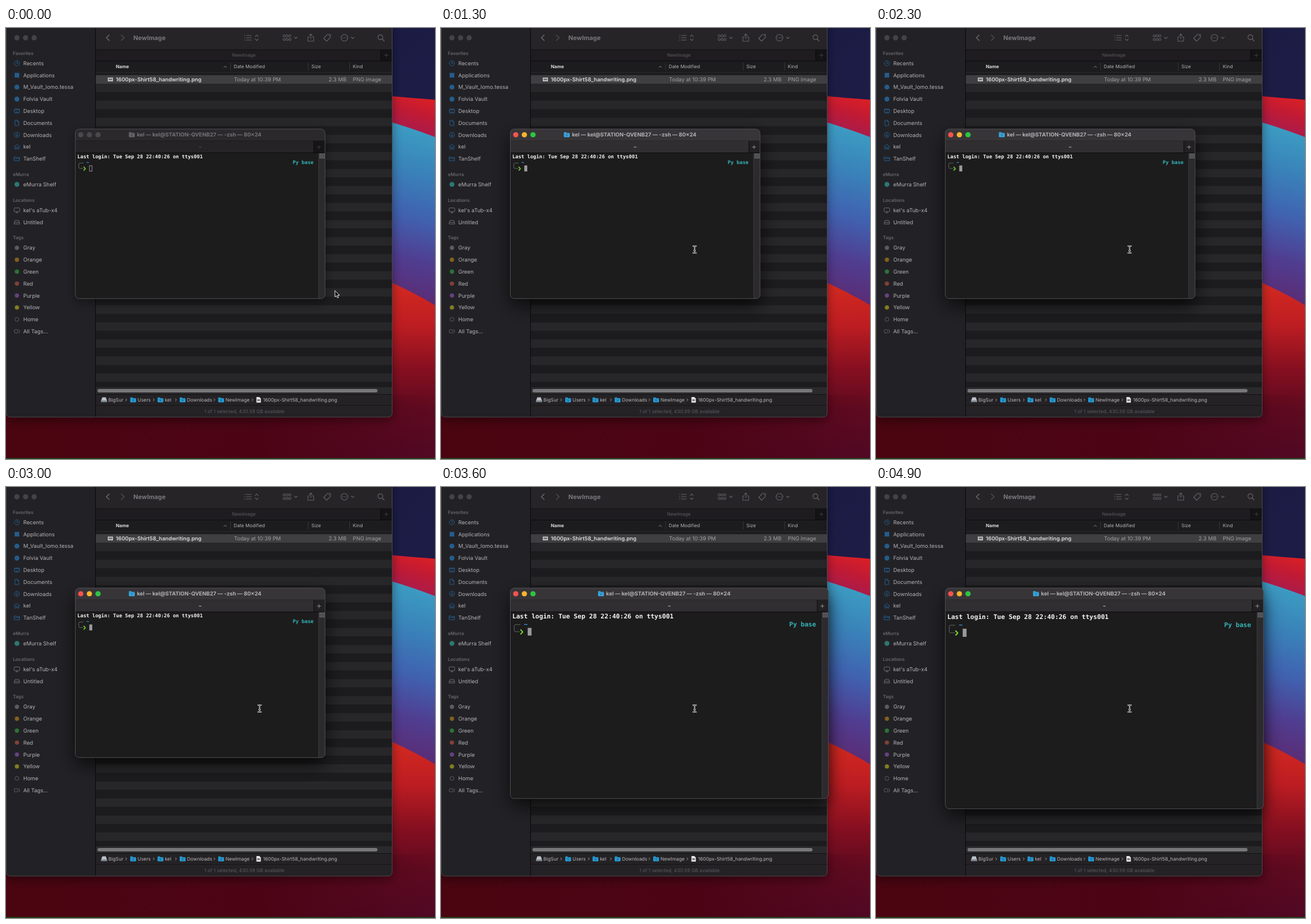
Animation, 746 px wide and 751 px high, one loop 5 s. Source, as an HTML page:

```html
<!DOCTYPE html>
<html lang="en">
<head>
<meta charset="utf-8">
<title>Terminal zoom</title>
<style>
html, body { margin: 0; width: 100%; height: 100%; overflow: hidden; background: #2a0309; }
svg { display: block; width: 746px; height: 751px; }
text { font-family: Inter, "Open Sans", sans-serif; text-rendering: geometricPrecision; white-space: pre; }
.mono { font-family: "DejaVu Sans Mono", "Liberation Mono", monospace; font-weight: 700; }
</style>
</head>
<body>
<svg id="stage" viewBox="0 0 746 751" xmlns="http://www.w3.org/2000/svg">
  <defs>
    <linearGradient id="navy" x1="0" y1="0" x2="1" y2="1">
      <stop offset="0" stop-color="#17173b"/><stop offset="1" stop-color="#20204f"/>
    </linearGradient>
    <linearGradient id="crimson" gradientUnits="userSpaceOnUse" x1="720" y1="120" x2="700" y2="185">
      <stop offset="0" stop-color="#d81f26"/><stop offset=".45" stop-color="#c01a35"/><stop offset="1" stop-color="#a51c50"/>
    </linearGradient>
    <linearGradient id="sea" gradientUnits="userSpaceOnUse" x1="725" y1="175" x2="650" y2="468">
      <stop offset="0" stop-color="#3c9dc2"/><stop offset=".25" stop-color="#3982b9"/>
      <stop offset=".5" stop-color="#4062b0"/><stop offset=".75" stop-color="#503d90"/>
      <stop offset="1" stop-color="#5c2a72"/>
    </linearGradient>
    <linearGradient id="ember" gradientUnits="userSpaceOnUse" x1="0" y1="440" x2="0" y2="751">
      <stop offset="0" stop-color="#d42a20"/><stop offset=".25" stop-color="#bd1d22"/>
      <stop offset=".5" stop-color="#850f20"/><stop offset=".72" stop-color="#5f0a20"/>
      <stop offset="1" stop-color="#500824"/>
    </linearGradient>
    <linearGradient id="floor" x1="0" y1="0" x2="1" y2="0">
      <stop offset="0" stop-color="#4a0510"/><stop offset=".6" stop-color="#4c0415"/><stop offset="1" stop-color="#4c0415" stop-opacity="0"/>
    </linearGradient>
    <filter id="faint" x="-20%" y="-20%" width="140%" height="150%">
      <feDropShadow dx="0" dy="6" stdDeviation="9" flood-color="#000" flood-opacity=".42"/>
    </filter>
    <filter id="deep" x="-20%" y="-20%" width="140%" height="150%">
      <feDropShadow dx="0" dy="12" stdDeviation="16" flood-color="#000" flood-opacity=".7"/>
    </filter>
    <clipPath id="list"><rect x="156" y="78" width="515" height="548"/></clipPath>
    <g id="folder">
      <path d="M0 1.6q0-1.2 1.2-1.2h2.6l1.2 1.2h4q1.2 0 1.2 1.2v5q0 1.2-1.2 1.2h-7.8q-1.2 0-1.2-1.2z"/>
      <path d="M0 3.2h10.2" stroke="#000" stroke-opacity=".25" stroke-width=".7"/>
      <rect x="3.6" y="4.5" width="3" height="2.7" fill="#000" fill-opacity=".25"/>
    </g>
  </defs>

  <rect width="746" height="751" fill="url(#navy)"/>
  <path d="M640 116.5Q710 122 746 125V200H640z" fill="url(#crimson)"/>
  <path d="M640 155Q705 174 746 190V490H640z" fill="url(#sea)"/>
  <path d="M0 437H655Q705 458 746 483V751H0z" fill="url(#ember)"/>
  <rect y="640" width="746" height="111" fill="url(#floor)"/>
  <rect y="749.5" width="746" height="1.5" fill="#17521c"/>

  <g id="finder"></g>
  <g id="term"></g>
  <g id="pointer">
    <path id="arrow" d="M0 0V11.2L2.6 8.9L4.3 12.7L6.2 11.9L4.5 8.2H8z" fill="#080808" stroke="#f2f2f2" stroke-width="1" stroke-linejoin="round"/>
    <g id="beam" fill="none">
      <path d="M-3.4-6.2Q-.4-6.2 0-4.8Q.4-6.2 3.4-6.2M0-4.8V4.8M-3.4 6.2Q-.4 6.2 0 4.8Q.4 6.2 3.4 6.2M-2 1.8H2" stroke="#f0f0f0" stroke-width="2.2"/>
      <path d="M-3-6.2Q-.4-6.2 0-4.8Q.4-6.2 3-6.2M0-4.8V4.8M-3 6.2Q-.4 6.2 0 4.8Q.4 6.2 3 6.2M-1.6 1.8H1.6" stroke="#111" stroke-width=".8"/>
    </g>
  </g>
</svg>
<script>
const $ = id => document.getElementById(id);
const LOOP = 5000, TICK = 100;
const SCALE = 0.743;              // screen points to stage pixels
const WIN = { x: 120.5, y: 176 };

const rect = (x, y, w, h, fill, more = '') =>
  `<rect x="${x}" y="${y}" width="${w}" height="${h}" fill="${fill}" ${more}/>`;
const dot = (x, y, r, fill, more = '') =>
  `<circle cx="${x}" cy="${y}" r="${r}" fill="${fill}" ${more}/>`;
const line = (d, stroke, width = 1, more = '') =>
  `<path d="${d}" fill="none" stroke="${stroke}" stroke-width="${width}" stroke-linecap="round" stroke-linejoin="round" ${more}/>`;
// y is the vertical middle of the text
const label = (x, y, s, size, fill, weight = 400, anchor = 'start') =>
  `<text x="${x}" y="${y + size * 0.36}" font-size="${size}" fill="${fill}" font-weight="${weight}" text-anchor="${anchor}">${s}</text>`;
const mono = (x, y, s, size, fill) =>
  `<text class="mono" x="${x}" y="${y + size * 0.35}" font-size="${size}" fill="${fill}">${s}</text>`;
const folder = (x, y, fill) => `<use href="#folder" x="${x}" y="${y}" fill="${fill}"/>`;

const BLUE = '#245c8c', GRAY = '#6b696d', TOOL = '#646267';

// Sidebar glyphs, drawn around 0,0
const glyphs = {
  clock: c => dot(0, 0, 4.3, 'none', `stroke="${c}"`) + line('M0-2.6V.3H2', c),
  square: c => rect(-4, -4, 8, 8, c),
  disc: c => dot(0, 0, 4.3, c),
  desktop: c => rect(-4.5, -3.5, 9, 7, 'none', `rx="1.2" stroke="${c}"`) + line('M-4.2-2H4.2M-2.5 2H2.5', c),
  page: c => line('M-3-4.5H.8L3.2-2V4.5H-3zM.8-4.5V-2H3.2', c),
  down: c => dot(0, 0, 4.3, 'none', `stroke="${c}"`) + line('M0-2.3V2.2M-1.8.5L0 2.3L1.8.5', c),
  home: c => line('M-4.8 0L0-4.3L4.8 0M-3.4-.8V4H-1V1H1V4H3.4V-.8', c),
  folder: c => line('M-4.5-3H-1.5L-.5-2H4.5V3.5H-4.5zM-4.5-.5H4.5', c),
  screen: c => rect(-4.8, -4, 9.6, 6.6, 'none', `rx="1" stroke="${c}"`) + line('M-1.8 4.4H1.8M0 2.8V4.2', c),
  drive: c => line('M-4.6.4L-3-3H3L4.6.4V3.2H-4.6zM-4.6.4H4.6', c),
  tag: c => dot(0, 0, 3.7, c),
  ring: c => dot(0, 0, 3.4, 'none', `stroke="${c}" stroke-width=".8"`),
  tags: c => rect(-4.5, -2.8, 6, 5.6, 'none', `rx="1.5" stroke="${c}" stroke-width=".8"`) + line('M3-2.8Q4.5-2.8 4.5-1.3V1.3Q4.5 2.8 3 2.8', c, .8)
};

const sections = [
  ['Favorites', 44, 61.5, [
    ['clock', 'Recents', BLUE], ['square', 'Applications', BLUE], ['disc', 'M_Vault_lomo.tessa', BLUE],
    ['disc', 'Folvia Vault', BLUE], ['desktop', 'Desktop', BLUE], ['page', 'Documents', BLUE],
    ['down', 'Downloads', BLUE], ['home', 'kel', BLUE], ['folder', 'TanShelf', BLUE]]],
  ['eMurra', 255, 272.5, [['disc', 'eMurra Shelf', '#2d7773']]],
  ['Locations', 300, 317.5, [['screen', "kel's aTub-x4", GRAY], ['drive', 'Untitled', GRAY]]],
  ['Tags', 365.5, 383, [
    ['tag', 'Gray', '#5c5b5e'], ['tag', 'Orange', '#84601f'], ['tag', 'Green', '#2c7336'],
    ['tag', 'Red', '#824036'], ['tag', 'Purple', '#674083'], ['tag', 'Yellow', '#857c20'],
    ['ring', 'Home', GRAY], ['tags', 'All Tags...', GRAY]]]
];

function sidebar() {
  return sections.map(([head, hy, top, items]) =>
    label(12, hy, head, 8, '#69676b', 600) +
    items.map(([icon, name, color], i) => {
      const y = top + i * 20.78;
      return `<g transform="translate(19 ${y})">${glyphs[icon](color)}</g>` + label(30, y, name, 9.4, '#b3b1b4');
    }).join('')).join('');
}

function toolbar() {
  const chevron = x => line(`M${x - 2.5} 15.8L${x} 18.3L${x + 2.5} 15.8`, TOOL, 1.2);
  let s = line('M179.5 12.2L174.5 17L179.5 21.8', '#6f6d71', 1.3) + line('M200.5 12.2L205.5 17L200.5 21.8', '#504e52', 1.3);
  s += label(221.5, 17, 'NewImage', 10.8, '#79777b', 700);
  for (const y of [13, 17, 21]) s += dot(415, y, .8, TOOL) + line(`M418 ${y}H426.5`, TOOL, 1.2);
  s += line('M433.5 14.8L436 12.2L438.5 14.8M433.5 19.2L436 21.8L438.5 19.2', TOOL, 1.2);
  for (const y of [12, 18.3]) for (const x of [482, 487, 492]) s += rect(x, y, 3.4, 3.4, 'none', `rx=".6" stroke="${TOOL}"`);
  s += chevron(504);
  s += line('M527.5 15.5H525V23H535V15.5H532.5M530 19V10.5M527.5 12.8L530 10.3L532.5 12.8', TOOL, 1.1);
  s += line('M552.5 18L559 11.2L564.3 11.3L564.2 16.4L557.5 23z', TOOL, 1.1) + dot(562, 13.6, .8, TOOL);
  s += dot(588.5, 17, 5.8, 'none', `stroke="${TOOL}" stroke-width="1.1"`);
  for (const x of [585.8, 588.5, 591.2]) s += dot(x, 17, .8, TOOL);
  s += chevron(603);
  s += dot(651, 16, 4.2, 'none', `stroke="${TOOL}" stroke-width="1.2"`) + line('M654.2 19.2L657.5 22.5', TOOL, 1.3);
  return s;
}

function rows() {
  let s = '';
  for (let i = 0; i < 37; i++) s += rect(156, 82.2 + i * 14.85, 516, 14.85, i === 0 ? '#3f3e40' : i % 2 ? '#272628' : '#1c1b1d');
  return `<g clip-path="url(#list)">${s}</g>` +
    rect(177, 86.5, 9, 6.4, '#d0d0d0') + rect(178.2, 88, 6.6, 3.2, '#77777a') +
    label(191, 89.8, '1600px-Shirt58_handwriting.png', 9.3, '#dddcde', 600) +
    label(396.5, 89.8, 'Today at 10:39 PM', 9.35, '#a09fa1') +
    label(592, 89.8, '2.3 MB', 9.35, '#a09fa1', 400, 'end') +
    label(603, 89.8, 'PNG image', 9.35, '#a09fa1');
}

function header() {
  const cut = x => rect(x, 60, 1, 14, '#353336');
  return rect(156, 37, 516, 20, '#1e1c1f') + rect(156, 37, 516, 1, '#121113') + rect(156, 57, 516, 1, '#0b0a0b') +
    rect(651, 38, 21, 19, '#141315') + rect(651, 38, 1, 19, '#0b0a0b') + line('M658.5 47.5H664.5M661.5 44.5V50.5', '#3c3a3e') +
    label(413.5, 47.3, 'NewImage', 8.1, '#5f5d61', 400, 'middle') +
    rect(156, 58, 516, 20, '#1c1b1d') + rect(156, 77, 516, 1, '#2b292c') +
    label(191, 67.5, 'Name', 8, '#dedddf', 700) + line('M378.8 68.8L381.2 66.4L383.6 68.8', '#8a888c') +
    label(396, 67.5, 'Date Modified', 8.2, '#b3b2b4') + label(531, 67.5, 'Size', 8.2, '#b3b2b4') +
    label(603, 67.5, 'Kind', 8.2, '#b3b2b4') + [390, 525, 597].map(cut).join('');
}

function pathBar() {
  const y = 648, cyan = '#279bd4';
  const crumbs = [[216, 'Users'], [263.5, 'kel'], [302, 'Downloads'], [369, 'NewImage']];
  let s = rect(156, 626, 516, 12, '#2a292b') + rect(159, 629, 487, 6, '#777678', 'rx="3"') +
    rect(156, 638, 516, 40, '#242225') + rect(156, 638, 516, 1, '#111') + rect(156, 657, 516, 1, '#151416');
  s += '<path d="M167.5 643.5H173.5L175.5 649V652H165.5V649z" fill="#b9c0c8"/>' + rect(165.5, 649, 10, 3, '#7f868e');
  s += label(178, y, 'BigSur', 8.35, '#b8b7b9');
  for (const [x, name] of crumbs) s += folder(x, y - 4.7, cyan) + label(x + 12.7, y, name, 8.35, '#b8b7b9');
  for (const x of [209, 257, 295.5, 362.5, 428.5]) s += line(`M${x - 1} ${y - 2}L${x + 1} ${y}L${x - 1} ${y + 2}`, '#9b9a9c');
  s += '<path d="M435.5 643H440.5L443.2 645.8V652.8H435.5z" fill="#e4e4e4"/>' + rect(437, 647, 4.6, 3, '#77777a');
  return s + label(447, y, '1600px-Shirt58_handwriting.png', 8.35, '#b8b7b9') +
    label(414.5, 668.3, '1 of 1 selected, 430.59 GB available', 8.4, '#5d5b5f', 400, 'middle');
}

function drawFinder() {
  const frame = 'M.5-20H671.5V670.5Q671.5 678 664 678H8Q.5 678 .5 670.5z';
  const dots = [19, 34, 49].map(x => dot(x, 17, 4.5, '#454347')).join('');
  $('finder').innerHTML =
    `<path d="${frame}" fill="#242226" filter="url(#faint)"/>` +
    `<clipPath id="body"><path d="${frame}"/></clipPath><g clip-path="url(#body)">` +
    rect(156, 0, 516, 37, '#262427') + rect(156, 78, 516, 548, '#1c1b1d') +
    dots + sidebar() + toolbar() + header() + rows() + pathBar() +
    rect(155, 0, 1.2, 678, '#0c0b0d') + '</g>' +
    `<path d="${frame}" fill="none" stroke="#4b494d" stroke-width="1"/>`;
}

// Cell size in points, by start time
const zooms = [[0, 7, 14], [3200, 8, 16], [3400, 8, 17], [3600, 9, 18], [3800, 9, 19]];

function drawTerm(cols, lines, active) {
  const { x, y } = WIN;
  const cw = cols * SCALE, ch = lines * SCALE;
  const w = (80 * cols + 24) * SCALE + .4, h = (24 * lines + 61.7) * SCALE;
  const right = x + w, mid = x + w / 2, size = cw / .602;
  const col = n => 124 + n * cw, row = n => 218.7 + (n + .5) * ch;
  const lights = active ? ['#f5544d', '#f8b52e', '#2ec541'] : Array(3).fill('#4a484c');
  const box = `x="${x}" y="${y}" width="${w}" height="${h}" rx="7"`;

  let s = `<rect ${box} fill="#1c1b1d" filter="url(#${active ? 'deep' : 'faint'})"/><clipPath id="pane"><rect ${box}/></clipPath><g clip-path="url(#pane)">`;
  s += rect(x, y, w, 20.5, active ? '#373538' : '#2b292c') + rect(x, y + 20.5, w, 20.5, active ? '#302e31' : '#252326');
  s += rect(x, y + 20, w, 1, active ? '#2a282b' : '#1e1c1f');
  s += rect(right - 19.5, y + 20.5, 20, 20.5, active ? '#222023' : '#151416') + rect(right - 20, y + 20.5, 1, 20.5, '#0d0c0e');
  s += rect(x, y + 41, w, 1, '#0c0b0d');
  s += rect(right - 11.5, y + 42, 12, h, '#2c2a2d') + rect(right - 11.5, y + 42, 1, h, '#3d3b3e');
  s += rect(right - 9, 219.3, 7.4, 7.4, '#39373a', 'stroke="#88878a" stroke-width=".8"') + line(`M${right - 7.5} 221.8H${right - 3.3}M${right - 7.5} 224.2H${right - 3.3}`, '#88878a', .8);
  lights.forEach((c, i) => { s += dot(130 + i * 15, 186, 4.6, c); });
  s += folder(mid - 124, 181.2, active ? '#3aa8e0' : '#67656a');
  s += label(mid - 110, 185.8, 'kel — kel@STATION-QVENB27 — -zsh — 80×24', 9.28, active ? '#b3b2b4' : '#757377', 700);
  s += label(mid, 207.3, '~', 8.5, active ? '#d0cfd1' : '#5d5b5f', 500, 'middle');
  s += line(`M${right - 13.5} 207.5H${right - 7.5}M${right - 10.5} 204.5V210.5`, active ? '#8f8e90' : '#3c3a3e');

  s += mono(col(0), row(0), 'Last login: Tue Sep 28 22:40:26 on ttys001', size, '#f4f4f4');
  const left = col(.5), bend = cw * .4;
  s += line(`M${col(2)} ${row(1) + 1}H${left + bend}Q${left} ${row(1) + 1} ${left} ${row(1) + 1 + bend}V${row(2) - bend}Q${left} ${row(2)} ${left + bend} ${row(2)}H${col(1.9)}`, '#6e6d70', .9);
  s += mono(col(3), row(1), '~', size, '#3aa2f2');
  s += line(`M${col(2.2)} ${row(2) - cw * .48}L${col(2.7)} ${row(2) + .5}L${col(2.2)} ${row(2) + cw * .6}`, '#74dc2c', cw * .3);
  s += mono(col(72), row(1), 'Py base', size, '#35b3b8');
  s += active
    ? rect(col(4), row(2) - ch / 2, cw, ch, '#9a999b')
    : rect(col(4) + .3, row(2) - ch / 2 + .4, cw - .6, ch - .8, 'none', 'stroke="#a09fa1" stroke-width=".9"');
  s += `</g><rect ${box} fill="none" stroke="#555357" stroke-width=".9"/>`;
  $('term').innerHTML = s;
}

let shown = '';
function render(time) {
  const t = Math.floor((time % LOOP) / TICK) * TICK;
  const [, cols, lines] = zooms.filter(z => z[0] <= t).pop();
  const active = t >= 1000;
  const key = [cols, lines, active].join();
  if (key !== shown) { drawTerm(cols, lines, active); shown = key; }

  const p = Math.min(1, Math.max(0, (t - 200) / 700));
  const e = p * p * (3 - 2 * p);
  const px = 572 + (441 - 572) * e, py = 457.5 + (386 - 457.5) * e;
  const inside = px < 543;
  $('pointer').setAttribute('transform', `translate(${px} ${py})`);
  $('arrow').style.display = inside ? 'none' : '';
  $('beam').style.display = inside ? '' : 'none';
}

drawFinder();
const start = performance.now();
function loop() {
  render(performance.now() - start);
  requestAnimationFrame(loop);
}
loop();
</script>
</body>
</html>
```
